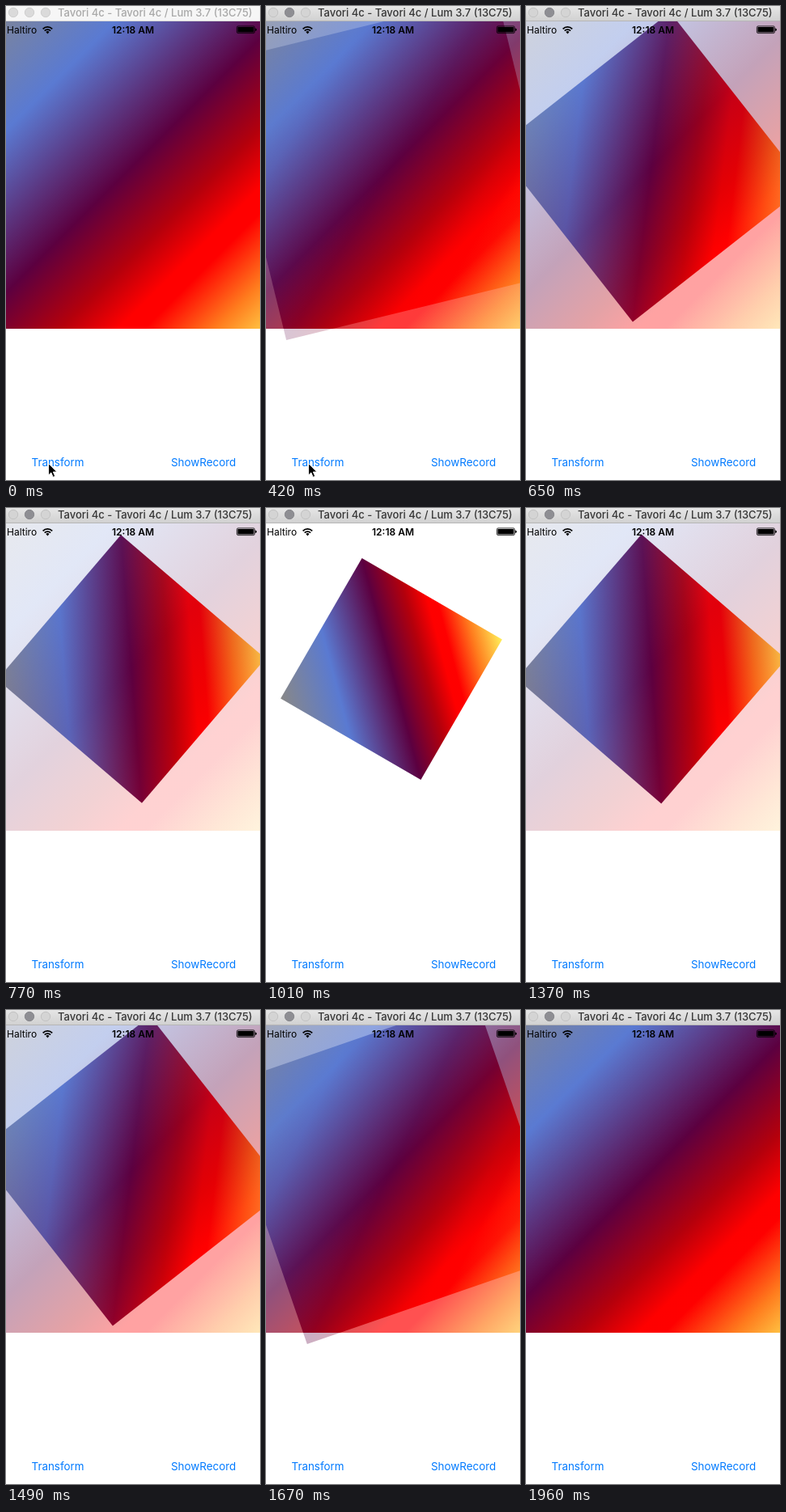
Recreate the animation shown at these times as an HTML page with a canvas. Size 314 by 586 pixels, loop 2060 ms.

```html
<!DOCTYPE html>
<html lang="en">
<head>
<meta charset="utf-8">
<title>Transform</title>
<style>
  html, body { margin: 0; width: 100%; height: 100%; overflow: hidden; background: #fff; }
  canvas, svg { position: absolute; left: 0; top: 0; display: block; }
  text { font-family: Inter, "Liberation Sans", sans-serif; }
  .title { font-size: 13px; font-weight: 500; fill: #a8a8a8; }
  .active .title { fill: #363636; }
  .bar { fill: #f6f6f6; }
  .active .bar { fill: url(#chrome); }
  .edge { fill: #d6d6d6; }
  .active .edge { fill: #b6b6b6; }
  .light { fill: #dadada; stroke: #cfcfcf; }
  .active .light { fill: #d4d4d4; stroke: #c3c3c3; }
  .active .mid { fill: #8e8e93; stroke: #88888d; }
  .status { font-size: 12px; }
  .button { font-size: 13.4px; fill: #007aff; }
</style>
</head>
<body>
<canvas id="view" width="314" height="586"></canvas>
<svg id="ui" width="314" height="586" viewBox="0 0 314 586">
  <defs>
    <linearGradient id="chrome" x1="0" y1="0" x2="0" y2="1">
      <stop offset="0" stop-color="#e6e6e6"/>
      <stop offset="1" stop-color="#d0d0d0"/>
    </linearGradient>
  </defs>

  <rect class="bar" width="314" height="19"/>
  <rect class="edge" y="18" width="314" height="1"/>
  <circle class="light" cx="9" cy="8" r="5.7"/>
  <circle class="light mid" cx="29" cy="8" r="5.7"/>
  <circle class="light" cx="49" cy="8" r="5.7"/>
  <text class="title" x="64" y="13">Tavori 4c - Tavori 4c / Lum 3.7 (13C75)</text>

  <text class="status" x="1" y="34">Haltiro</text>
  <text class="status" x="157" y="34" text-anchor="middle" font-weight="600">12:18 AM</text>
  <g fill="none" stroke="#000" stroke-width="1.7">
    <path d="M45.6 28.3 A8.2 8.2 0 0 1 57.2 28.3"/>
    <path d="M47.7 30.6 A5.2 5.2 0 0 1 55.1 30.6"/>
  </g>
  <path d="M49.3 32.1 A3 3 0 0 1 53.5 32.1 L51.4 34.4 Z"/>
  <rect x="285.4" y="24.9" width="22" height="8.7" rx="1.6" fill="none" stroke="#000" stroke-width=".8"/>
  <rect x="286.4" y="25.9" width="20" height="6.7" rx=".7"/>
  <path d="M308.2 27.6 A1.7 1.7 0 0 1 308.2 31 Z"/>

  <text class="button" id="tap" x="31.5" y="569">Transform</text>
  <text class="button" x="204" y="569">ShowRecord</text>
  <path id="cursor" d="M52.5 565.5 V580 L55.8 576.9 L58.2 582.4 L60.7 581.3 L58.3 576 H62.8 Z"
        fill="#000" stroke="#fff" stroke-width=".9"/>
</svg>
<script>
  const LOOP = 2060;
  const CENTER = [155, 199];
  const SIZE = 400;
  const STOPS = {
    0: '#888888', 0.25: '#5a7ad2', 0.5: '#5c0040', 0.64: '#b4000c',
    0.73: '#ff0000', 0.77: '#ff0000', 0.88: '#ff7d1e', 1: '#fff05a'
  };

  const ui = document.getElementById('ui');
  const tap = document.getElementById('tap');
  const cursor = document.getElementById('cursor');
  const ctx = document.getElementById('view').getContext('2d');

  const half = SIZE / 2;
  const gradient = ctx.createLinearGradient(-half, -half, half, half);
  for (const at in STOPS) gradient.addColorStop(+at, STOPS[at]);

  const clamp = v => Math.min(1, Math.max(0, v));

  // cubic-bezier(.42, 0, .58, 1)
  function easeInOut(x) {
    if (x <= 0 || x >= 1) return clamp(x);
    let lo = 0, hi = 1;
    for (let i = 0; i < 24; i++) {
      const u = (lo + hi) / 2, v = 1 - u;
      if (1.26 * u * v * v + 1.74 * u * u * v + u * u * u < x) lo = u;
      else hi = u;
    }
    return lo * lo * (3 - 2 * lo);
  }

  // The picture advances in short holds rather than continuously.
  function hold(t) {
    if (t >= 1960) return 1960;
    const base = t < 590 ? 0 : 590;
    return base + Math.floor((t - base) / 60) * 60;
  }

  const progress = t => easeInOut((t - 113) / 926) - easeInOut((t - 1090) / 952);

  function square(scale, angle, alpha) {
    ctx.save();
    ctx.translate(...CENTER);
    ctx.rotate(angle);
    ctx.scale(scale, scale);
    ctx.globalAlpha = alpha;
    ctx.fillStyle = gradient;
    ctx.fillRect(-half, -half, SIZE, SIZE);
    ctx.restore();
  }

  function draw(t) {
    const p = clamp(progress(t));
    ctx.clearRect(0, 0, 314, 586);
    // Additive cross-fade: the two alphas sum to one where they overlap.
    ctx.globalCompositeOperation = 'lighter';
    square(1, 0, 1 - p);
    square(1 - p / 2, -p * Math.PI / 3, p);

    ui.classList.toggle('active', t >= 60);
    tap.style.opacity = t < 60 ? 1 : clamp(0.3 + (t - 60) / 300);
    cursor.style.display = t < 590 ? '' : 'none';
  }

  const start = performance.now();
  function tick() {
    draw(hold((performance.now() - start) % LOOP));
    requestAnimationFrame(tick);
  }
  tick();
</script>
</body>
</html>
```
